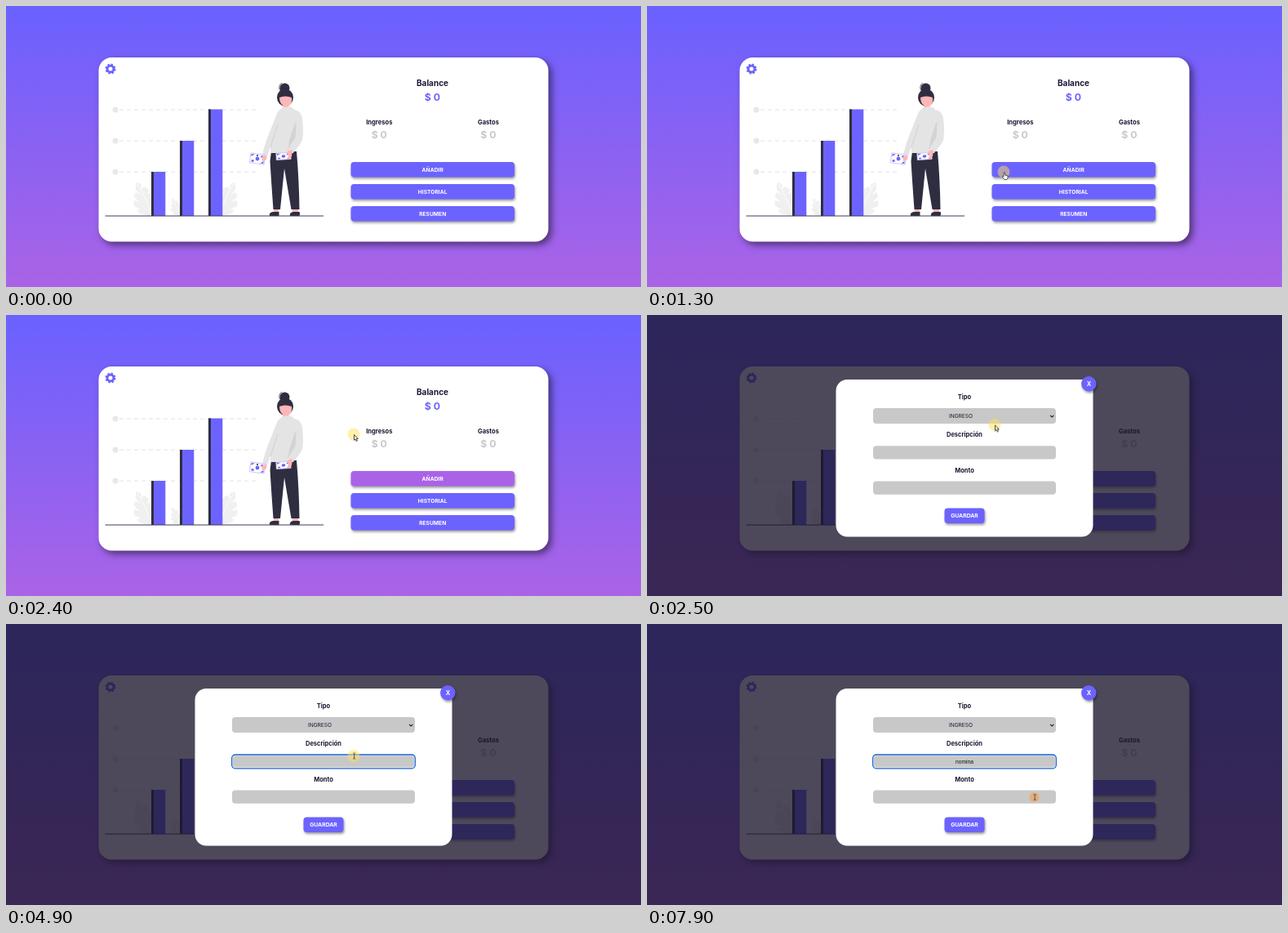
Write an HTML page that moves like this. It is 778 px wide and 344 px high and loops after 8 s.

```html
<!DOCTYPE html>
<html lang="es">
<head>
<meta charset="utf-8">
<title>Balance</title>
<style>
html, body { margin: 0; width: 100%; height: 100%; overflow: hidden; }
svg { display: block; width: 778px; height: 344px; }
text { font-family: Inter, "Open Sans", sans-serif; font-weight: 700; text-anchor: middle; fill: #1b1833; }
.white { fill: #fff; }
.grey { fill: #c8c8c8; }
.blue { fill: #6c63ff; }
.dark { fill: #2f2e41; }
.skin { fill: #ffb6b6; }
.wool { fill: #e4e4e4; }
.drop { filter: drop-shadow(1px 2px 1.5px rgba(0, 0, 0, .4)); }
.card { filter: drop-shadow(4px 4px 4px rgba(0, 0, 0, .5)); }
#typed { font: 6.67px "Liberation Sans", Arial, sans-serif; fill: #111; }

.anim { animation: 8s step-end infinite; }
#cursor { animation-name: move; }
#arrow { animation-name: arrow; }
#hand { animation-name: hand; }
#beam { animation-name: beam; }
#modal { animation-name: modal; }
#focus { animation-name: focus; }
#spot { animation-name: press; }
#add { animation-name: add; }
#log { animation-name: log; }
#sum { animation-name: sum; }

@keyframes move {
  0% { transform: translate(505px, 360px); }
  1.25% { transform: translate(500px, 338px); animation-timing-function: steps(9); }
  12.5% { transform: translate(450px, 250px); animation-timing-function: steps(3); }
  16.25% { transform: translate(437px, 203px); animation-timing-function: steps(5); }
  22.5%, 27.5% { transform: translate(427.5px, 201px); }
  27.5% { animation-timing-function: steps(2); }
  30% { transform: translate(426px, 146px); }
  31.25% { transform: translate(426px, 134.5px); animation-timing-function: steps(2); }
  33.75%, 38.75% { transform: translate(425.5px, 128px); }
  38.75% { animation-timing-function: steps(9); }
  50%, 80% { transform: translate(426px, 161.5px); }
  80% { animation-timing-function: steps(3); }
  83.75% { transform: translate(461px, 152px); animation-timing-function: steps(3); }
  87.5% { transform: translate(477.5px, 182px); animation-timing-function: steps(3); }
  91.25%, 100% { transform: translate(474.5px, 212px); }
}
@keyframes arrow {
  0% { opacity: 0; }
  1.25% { opacity: 1; }
  12.5% { opacity: 0; }
  28.75% { opacity: 1; }
  50% { opacity: 0; }
  81.25% { opacity: 1; }
  90%, 100% { opacity: 0; }
}
@keyframes hand {
  0% { opacity: 0; }
  12.5% { opacity: 1; }
  28.75%, 100% { opacity: 0; }
}
@keyframes beam {
  0% { opacity: 0; }
  50% { opacity: 1; }
  81.25% { opacity: 0; }
  90%, 100% { opacity: 1; }
}
@keyframes modal {
  0% { opacity: 0; }
  31.25%, 100% { opacity: 1; }
}
@keyframes focus {
  0% { opacity: 0; }
  55%, 100% { opacity: 1; }
}
@keyframes press {
  0% { fill: #ffe15a; r: 7.5px; }
  95% { fill: #ffc04a; r: 7px; }
  96.25% { fill: #ffa53c; r: 6.5px; }
  97.5%, 100% { fill: #ff9632; r: 6px; }
}
@keyframes add {
  0% { fill: #6c63ff; }
  23.75% { fill: #8b63f4; }
  25% { fill: #aa63e8; }
  31.25%, 100% { fill: #6c63ff; }
}
@keyframes log {
  0% { fill: #6c63ff; }
  21.25% { fill: #8b63f4; }
  22.5% { fill: #aa63e8; }
  23.75% { fill: #8b63f4; }
  25%, 100% { fill: #6c63ff; }
}
@keyframes sum {
  0% { fill: #6c63ff; }
  18.75% { fill: #8b63f4; }
  20% { fill: #aa63e8; }
  21.25% { fill: #8b63f4; }
  22.5%, 100% { fill: #6c63ff; }
}
</style>
</head>
<body>
<svg viewBox="0 0 778 344">
  <defs>
    <linearGradient id="sky" x2="0" y2="1">
      <stop stop-color="#6a61ff"/>
      <stop offset="1" stop-color="#aa63e6"/>
    </linearGradient>
    <g id="leaf">
      <path fill="#f0f0f0" d="M0 0C-7 0-15-2-18-7L-13-8-21-12Q-22-16-21-19L-14-17-21-23Q-21-27-19-29L-13-26-19-32Q-20-38-18-41Q-14-40-12-38L-13-32-9-36Q-4-34-3-31L-5-26-2-28Q1-22 0-14Z"/>
      <path fill="none" stroke="#fff" stroke-width=".8" d="M0-2Q-6-22-17-39"/>
    </g>
    <g id="bill">
      <rect x="-9" y="-6" width="18" height="12" fill="#fff" stroke="#b9b5f5" stroke-width=".7"/>
      <circle r="2.4" class="blue"/>
      <path class="blue" d="M-8-5h4l-4 3zM8 5h-4l4-3zM-7 2h3v2.5h-3zM4-4.5h3v2.5h-3z"/>
    </g>
  </defs>

  <rect width="778" height="344" fill="url(#sky)"/>
  <rect class="card white" x="113.5" y="63" width="551" height="225.5" rx="16"/>

  <g fill="none" stroke="#6c63ff">
    <circle cx="128" cy="77" r="3.9" stroke-width="2.8"/>
    <circle cx="128" cy="77" r="5.5" stroke-width="1.9" stroke-dasharray="2.4 1.92"/>
  </g>

  <g fill="none" stroke="#e2e2e2">
    <path stroke-dasharray="5 4" d="M139 127H307M139 165H307M139 203H307"/>
    <path stroke="#e8e8e8" stroke-width="7" stroke-linecap="round" d="M134 127h.01M134 165h.01M134 203h.01"/>
  </g>
  <use href="#leaf" x="178" y="257"/>
  <use href="#leaf" transform="translate(213 257) scale(.52)"/>
  <use href="#leaf" transform="translate(262 257) scale(-1 1)"/>
  <path class="blue" d="M178 203h17.3v54H178zM213 165h17.3v92H213zM248 126.5h17.3V257H248z"/>
  <path class="dark" d="M178 203h3v54h-3zM213 165h3v92h-3zM248 126.5h3V257h-3z"/>

  <g id="woman">
    <path class="skin" d="M328 246h6v8h-6zM351 246h7v8h-7z"/>
    <path class="dark" d="M323 257q-1-4 4-5h7.500v5zM348 257q-1-4 4-5h7.500q1 2 0 5z"/>
    <path class="dark" d="M325 178H356Q359 212 359.500 249H349.500L341 199 336 249H327.500Q325 215 323.500 190Z"/>
    <circle class="dark" cx="341.500" cy="100.500" r="6"/>
    <path fill="none" stroke="#2f2e41" stroke-width=".8" d="M337 105Q332 99 338 94"/>
    <ellipse class="dark" cx="342" cy="112" rx="10" ry="10.500"/>
    <path class="skin" d="M335 112Q342 109 350 112Q351 120 346 123L347 127H339L339.500 122Q335 119 335 112Z"/>
    <path class="skin" d="M315 181l5 1-1 6-4 2-2-5z"/>
    <path class="wool" d="M338 125Q345 122 351 124.500L353 127Q361 128 363 137Q365 155 363 164Q360 171 353 178L352 180H324V172L320 184 314 182Q318 165 326 147L331 134Q333 128 338 125Z"/>
    <path fill="none" stroke="#cfcfcf" stroke-width=".9" d="M333 145L324 173M355 142L354 160 345 175"/>
    <path fill="#d3d3d3" d="M354 143L354 162 346 173 347 165Z"/>
    <use href="#bill" transform="translate(308 187) rotate(8)"/>
    <circle class="dark" cx="308" cy="183" r="1"/>
    <use href="#bill" transform="translate(340 184) rotate(-4) scale(1 .68)"/>
    <path class="skin" d="M344 179q4-4 7-2l-1 7q-3 4-6 4l2-5zM313 185q4-3 6-1l-1 5-4 1z"/>
  </g>
  <path stroke="#3f3d56" d="M121.500 257H389"/>

  <text x="522.500" y="98" font-size="10">Balance</text>
  <text x="522.500" y="115.500" font-size="12.300" style="fill:#6c63ff">$ 0</text>
  <text x="457.300" y="144.700" font-size="7.600">Ingresos</text>
  <text x="591" y="144.700" font-size="7.600">Gastos</text>
  <text x="457.300" y="161.500" font-size="12.300" style="fill:#c9c9c9">$ 0</text>
  <text x="591" y="161.500" font-size="12.300" style="fill:#c9c9c9">$ 0</text>

  <g class="drop">
    <rect class="anim" id="add" x="422.500" y="191" width="200.500" height="18.500" rx="4"/>
    <rect class="anim" id="log" x="422.500" y="218" width="200.500" height="18.500" rx="4"/>
    <rect class="anim" id="sum" x="422.500" y="245" width="200.500" height="18.500" rx="4"/>
  </g>
  <g font-size="6.700">
    <text class="white" x="522.700" y="202.700">AÑADIR</text>
    <text class="white" x="522.700" y="229.700">HISTORIAL</text>
    <text class="white" x="522.700" y="256.700">RESUMEN</text>
  </g>

  <g class="anim" id="modal">
    <rect width="778" height="344" fill="#1c172c" opacity=".78"/>
    <rect class="white" x="231.500" y="79" width="315" height="192.500" rx="14"/>
    <g class="drop">
      <circle class="blue" cx="541.300" cy="84.300" r="9.200"/>
      <rect class="blue" x="364.500" y="236.500" width="49" height="18.500" rx="4"/>
    </g>
    <text class="white" x="541.400" y="87" font-size="7.500">X</text>
    <text class="white" x="389" y="248.300" font-size="6.800">GUARDAR</text>
    <g font-size="7.500">
      <text x="389" y="103.200">Tipo</text>
      <text x="389" y="149.300">Descripción</text>
      <text x="389" y="192.500">Monto</text>
    </g>
    <rect class="grey" x="277" y="114" width="224" height="19" rx="4"/>
    <rect class="grey" x="277" y="160.300" width="224" height="16.200" rx="4"/>
    <rect class="grey" x="277" y="203.600" width="224" height="16.200" rx="4"/>
    <text x="384.500" y="126.300" font-size="6.600" style="font-weight:400">INGRESO</text>
    <path fill="none" stroke="#222" stroke-width="1.100" d="M494 122.800l2.200 2.200 2.200-2.200"/>
    <g class="anim" id="focus">
      <rect x="276.700" y="160" width="224.600" height="16.800" rx="4.300" fill="none" stroke="#fff" stroke-width="2.600"/>
      <rect x="276.700" y="160" width="224.600" height="16.800" rx="4.300" fill="none" stroke="#1763d0" stroke-width="1.300"/>
      <text id="typed" x="389" y="171"></text>
      <rect id="caret" y="164.500" width=".7" height="8"/>
    </g>
  </g>

  <g class="anim" id="cursor">
    <circle class="anim" id="spot" r="7.500" opacity=".5"/>
    <path class="anim" id="arrow" fill="#fff" stroke="#222" stroke-width=".8" d="M.5.500V7.300L2 6 3.200 8.500 4.400 8 3.300 5.500H5.300Z"/>
    <path class="anim" id="hand" fill="#fff" stroke="#222" stroke-width=".7" d="M0 .8Q.8 0 1.500.8V4L5 5V7.500L4 9.500H.8L-1.800 6Q-1.500 4.800 0 6Z"/>
    <path class="anim" id="beam" fill="none" stroke="#333" stroke-width=".8" d="M-.8-3.500Q.5-3.500.7-2.800Q1-3.500 2.200-3.500M.7-3V3M-.8 3.500Q.5 3.500.7 2.800Q1 3.500 2.200 3.500"/>
  </g>
</svg>
<script>
const LOOP = 8000, WORD = "nomina";
const keys = [5500, 5700, 5800, 6000, 6100, 6300];
const caretOn = [[4400, 4900], [5500, 6700], [7200, 7700]];
const typed = document.getElementById("typed");
const caret = document.getElementById("caret");
const start = performance.now();

function draw(now) {
  const t = Math.max(0, now - start) % LOOP;
  const word = WORD.slice(0, keys.filter(k => t >= k).length);
  if (typed.textContent !== word) typed.textContent = word;
  caret.setAttribute("x", 389 + typed.getComputedTextLength() / 2);
  caret.setAttribute("opacity", caretOn.some(([a, b]) => t >= a && t < b) ? 1 : 0);
  requestAnimationFrame(draw);
}
requestAnimationFrame(draw);
</script>
</body>
</html>
```
